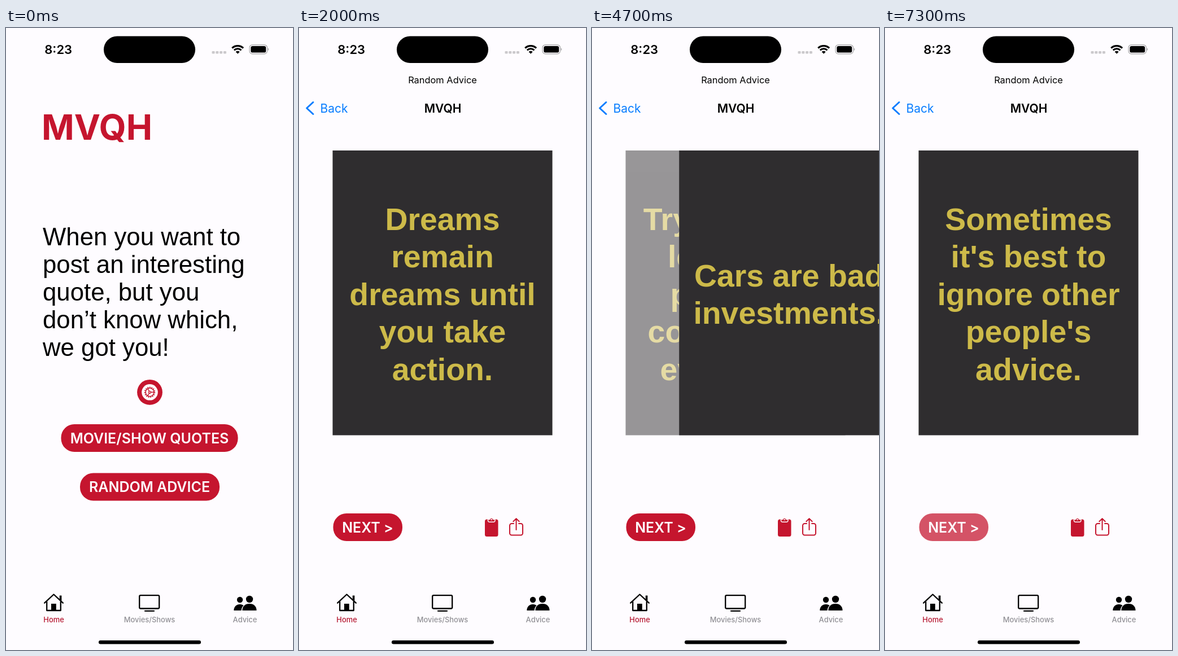
An HTML page that plays this animation: 508 px wide and 1102 px high, repeating every 7.5 s.

```html
<!DOCTYPE html>
<html lang="en">
<head>
<meta charset="utf-8">
<title>Advice app</title>
<style>
  html, body { margin: 0; width: 100%; height: 100%; overflow: hidden; background: #fefcff; }
  svg { display: block; width: 100%; height: 100%; }
  text { font-family: Inter, Roboto, sans-serif; }
  .mid { text-anchor: middle; }
  .bold { font-weight: 700; }
  .semi { font-weight: 600; }
  .body, .quote { font-family: "Liberation Sans", Arial, sans-serif; }
  .body { font-size: 43.75px; }
  .quote { font-size: 55.4px; font-weight: 700; fill: #cdba49; text-anchor: middle; }
  .label { font-size: 25px; font-weight: 600; fill: #fefcff; text-anchor: middle; }
  .tab { font-size: 12.9px; font-weight: 500; fill: #919095; text-anchor: middle; }
  .red { fill: #c5152e; }
  .line { fill: none; stroke: #000; stroke-width: 2.3; stroke-linejoin: round; stroke-linecap: round; }
  .redline { fill: none; stroke: #c5152e; stroke-linejoin: round; stroke-linecap: round; }
</style>
</head>
<body>
<svg viewBox="0 0 508 1102">
  <rect width="508" height="1102" fill="#fefcff"/>

  <g id="home">
    <text class="bold red" x="63" y="198" font-size="62">MVQH</text>
    <g id="intro"></g>
    <circle class="red" cx="254.5" cy="645.3" r="22.4"/>
    <circle cx="254.5" cy="645.3" r="14.3" fill="#fefcff"/>
    <g class="redline" transform="translate(254.5 645.3)" stroke-width="1.4">
      <circle r="7.3"/>
      <circle r="8.7" stroke-width="2" stroke-linecap="butt" stroke-dasharray="1.9 1.74"/>
      <circle r="1.9"/>
      <path d="M1.9 0H7M-1 -1.7L-3.5 -6.1M-1 1.7L-3.5 6.1"/>
    </g>
    <rect class="red" x="97.5" y="702" width="313" height="49" rx="23.5"/>
    <text class="label" x="254" y="735.5">MOVIE/SHOW QUOTES</text>
    <g id="adviceBtn">
      <rect class="red" x="131" y="788.5" width="247" height="49" rx="23.5"/>
      <text class="label" x="254" y="822">RANDOM ADVICE</text>
    </g>
  </g>
  <rect id="dim" width="508" height="1102" opacity="0"/>

  <g id="advice">
    <g id="page">
      <rect width="508" height="1102" fill="#fefcff"/>
      <g id="nextBtn">
        <rect class="red" x="60.5" y="860" width="122.5" height="49" rx="23.5"/>
        <text class="label" x="121.5" y="893.5">NEXT &gt;</text>
      </g>
      <rect class="red" x="329" y="870.5" width="23.5" height="30.5" rx="3.5"/>
      <path class="red" stroke="#fefcff" stroke-width="1.5" stroke-linejoin="round"
        d="M334.5 870.5h3a3.3 3.3 0 0 1 6.4 0h3v2.2a2.6 2.6 0 0 1-2.6 2.6h-7.2a2.6 2.6 0 0 1-2.6-2.6z"/>
      <circle cx="340.7" cy="871" r="1.2" fill="#fefcff"/>
      <path class="redline" stroke-width="2"
        d="M380 878h-3.5a3.5 3.5 0 0 0-3.5 3.5v13.5a3.5 3.5 0 0 0 3.5 3.5h16a3.5 3.5 0 0 0 3.5-3.5v-13.5a3.5 3.5 0 0 0-3.5-3.5h-3.5M384.5 889V869.5M379.3 874.3l5.2-5.2 5.2 5.2"/>
    </g>
    <g id="cards"></g>
    <text id="caption" class="mid" x="254" y="98" font-size="16.4">Random Advice</text>
    <g id="nav">
      <path d="M25 131.5L13.7 142L25 152.5" fill="none" stroke="#067cff" stroke-width="3" stroke-linecap="round" stroke-linejoin="round"/>
      <text x="37.5" y="149.7" font-size="21" fill="#067cff">Back</text>
      <text class="mid semi" x="254.5" y="149.7" font-size="21">MVQH</text>
    </g>
  </g>

  <g id="status">
    <text class="semi mid" x="92.7" y="46" font-size="22">8:23</text>
    <rect x="173" y="14.5" width="162" height="47.5" rx="23.7"/>
    <g fill="#cbc9cc">
      <rect x="364.5" y="41" width="5" height="4.5" rx="1.3"/>
      <rect x="371.3" y="41" width="5" height="4.5" rx="1.3"/>
      <rect x="378.1" y="41" width="5" height="4.5" rx="1.3"/>
      <rect x="384.9" y="41" width="5" height="4.5" rx="1.3"/>
    </g>
    <g fill="none" stroke="#000" stroke-width="3.2">
      <path d="M400.2 35.6a14.2 14.2 0 0 1 19.8 0"/>
      <path d="M403.8 39.3a9 9 0 0 1 12.6 0"/>
    </g>
    <path d="M406.6 42.2a5 5 0 0 1 7 0l-3.5 3.6z"/>
    <rect x="431" y="29.8" width="31.3" height="16" rx="5" fill="none" stroke="#a4a3a5" stroke-width="1.2"/>
    <rect x="433.3" y="32" width="26.8" height="11.6" rx="3.2"/>
    <path d="M463.7 35.3a2.8 2.8 0 0 1 0 5z" fill="#a4a3a5"/>
  </g>

  <g id="tabs">
    <path class="line" d="M68.2 1018.7L84.5 1003.5L100.8 1018.7M72.2 1016V1032H96.8V1016"/>
    <path d="M94.8 1005.5h3.6v9.6l-3.6-3.3zM80 1020h8.8v13H80z"/>
    <rect class="line" x="236.2" y="1005.2" width="35" height="23.3" rx="2"/>
    <path class="line" d="M246 1032.8H262"/>
    <circle cx="414" cy="1013" r="5.2"/>
    <path d="M403.3 1032c0-6.5 4.5-11 10.7-11c3.2 0 5.4 1 6.5 2.3c-2.2 2-3.6 4.5-4 8.7z"/>
    <circle cx="431" cy="1012" r="6.2"/>
    <path d="M418.3 1032c0-7.3 5-12 12.6-12s12.6 4.7 12.6 12z"/>
    <text class="tab" x="84.5" y="1053" style="fill:#b51730">Home</text>
    <text class="tab" x="254" y="1053">Movies/Shows</text>
    <text class="tab" x="423" y="1053">Advice</text>
    <rect x="164" y="1085" width="181" height="6.5" rx="3.2"/>
  </g>
</svg>
<script>
const LOOP = 7500, TICK = 100, WIDTH = 508, CARD_W = 389;
const PUSH = 1533, SETTLED = 2000, SPRING = 23.2, CARD_SPRING = 20.95;
const SWAPS = [3350, 4550, 6050], SWAP_MS = 304;
const INTRO = ["When you want to", "post an interesting", "quote, but you", "don’t know which,", "we got you!"];
const QUOTES = [
  ["Dreams", "remain", "dreams until", "you take", "action."],
  ["Cars are bad", "investments."],
  ["Try to pay at", "least one", "person a", "compliment", "every day."],
  ["Sometimes", "it's best to", "ignore other", "people's", "advice."]
];
// Press start and release for each button
const ADVICE_TAPS = [[1400, 1500]];
const NEXT_TAPS = [[3400, 3400], [4500, 4600], [5900, 6100], [7300, LOOP]];

const $ = id => document.getElementById(id);
const clamp = v => Math.min(1, Math.max(0, v));
const shift = (el, x, y = 0) => el.setAttribute("transform", `translate(${x} ${y})`);
const fade = (el, v) => el.setAttribute("opacity", v);
const show = (el, on) => el.setAttribute("display", on ? "inline" : "none");

function add(parent, tag, attrs, text) {
  const el = document.createElementNS("http://www.w3.org/2000/svg", tag);
  for (const key in attrs) el.setAttribute(key, attrs[key]);
  if (text) el.textContent = text;
  return parent.appendChild(el);
}

function addLines(parent, lines, cls, x, y, gap) {
  lines.forEach((line, i) => add(parent, "text", { class: cls, x, y: y + i * gap }, line));
}

addLines($("intro"), INTRO, "body", 65, 385, 49);

// Later cards lie below, so a leaving card covers the one fading in
const cards = [];
for (let i = QUOTES.length - 1; i >= 0; i--) {
  const card = cards[i] = add($("cards"), "g", {});
  const top = 490.8 - (QUOTES[i].length - 1) * 33.2;
  add(card, "rect", { x: 59.5, y: 217, width: CARD_W, height: 504.5, fill: "#2f2d2f" });
  addLines(card, QUOTES[i], "quote", 254, top, 66.4);
}

// Remaining share of a critically damped spring
function rest(t, rate) {
  const s = Math.max(0, t - PUSH) / 1000 * rate;
  return t >= SETTLED ? 0 : (1 + s) * Math.exp(-s);
}

function pressAlpha(t, taps) {
  for (const [down, up] of taps) {
    if (t >= down && t < up) return 0.73;
    if (t >= up && t < up + 100) return 0.88;
  }
  return 1;
}

function drawCards(t, x) {
  cards.forEach((card, i) => {
    const enter = i ? clamp((t - SWAPS[i - 1]) / SWAP_MS) : 1;
    const leave = i < SWAPS.length ? clamp((t - SWAPS[i]) / SWAP_MS) : 0;
    show(card, enter > 0 && leave < 1);
    fade(card, enter);
    shift(card, x + CARD_W * leave * leave);
  });
}

function draw(t) {
  const left = rest(t, SPRING), done = 1 - left, settled = t >= SETTLED;
  show($("advice"), t >= PUSH);
  shift($("home"), -0.3 * WIDTH * done);
  fade($("dim"), 0.1 * done);
  shift($("page"), WIDTH * left);
  drawCards(t, WIDTH * (left - rest(t, CARD_SPRING)));
  show($("caption"), settled);
  shift($("nav"), 0, settled ? 0 : -5);
  fade($("nav"), done);
  fade($("adviceBtn"), pressAlpha(t, ADVICE_TAPS));
  fade($("nextBtn"), pressAlpha(t, NEXT_TAPS));
}

const start = performance.now();
function frame() {
  const t = (performance.now() - start) % LOOP;
  draw(Math.floor(t / TICK) * TICK);
  requestAnimationFrame(frame);
}
frame();
</script>
</body>
</html>
```
